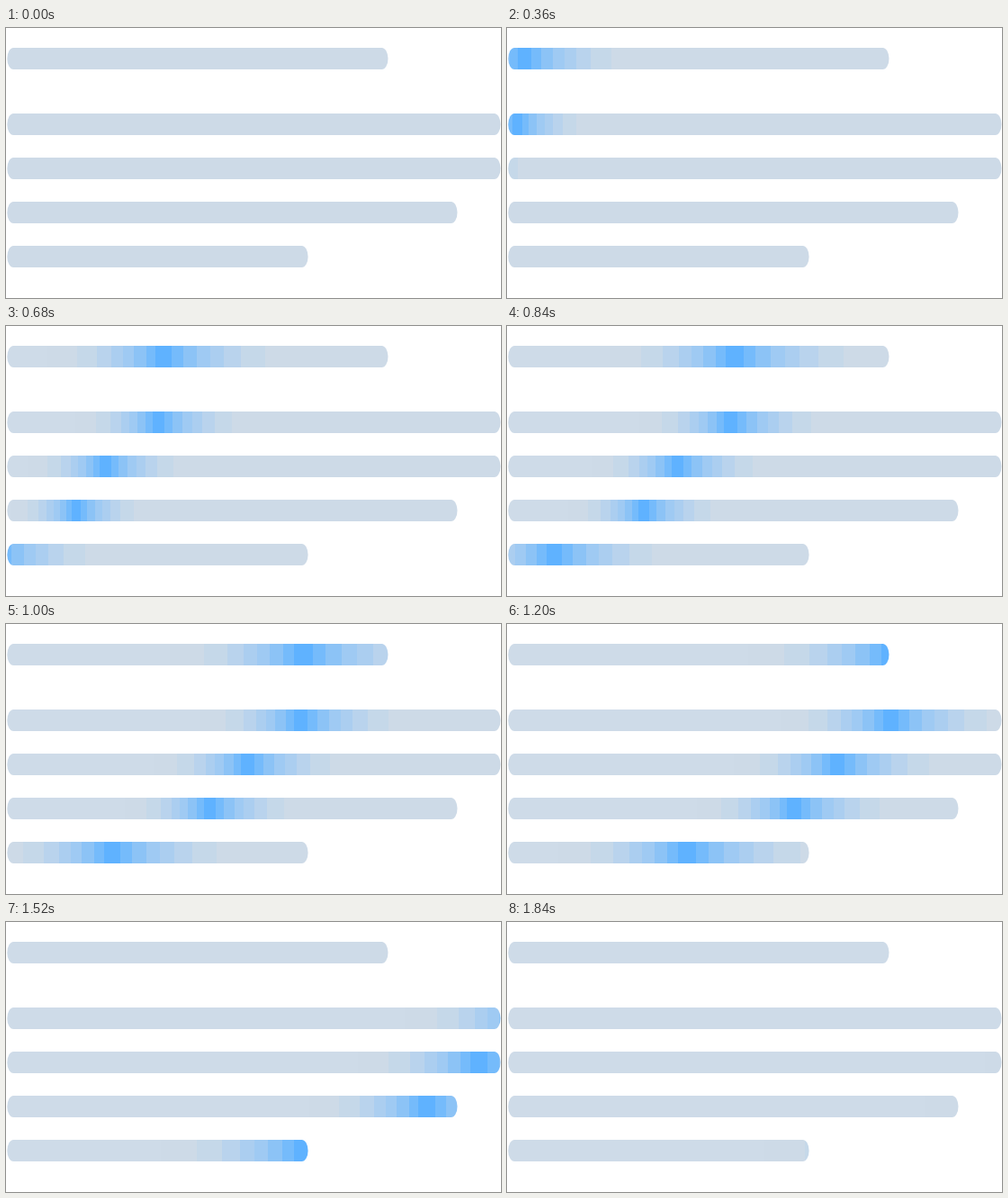
Animation, 550 px wide and 300 px high, one loop 2.32 s. Source, as an HTML page with a canvas:

```html
<!DOCTYPE html>
<html lang="en">
<head>
<meta charset="utf-8">
<title>Loading placeholder</title>
<style>
  html, body { margin: 0; width: 100%; height: 100%; overflow: hidden; background: #fff; }
  canvas { display: block; }
</style>
</head>
<body>
<canvas id="stage" width="550" height="300"></canvas>
<script>
const ctx = document.getElementById('stage').getContext('2d');
const LOOP = 2320, STEP = 40, START = 200, END = 1840;
const LEFT = 1.3, HEIGHT = 24;
const BASE = '#cddae7', TRAIL = '#cedbe8';

// Bands of the glow from its centre outwards; edges are shares of its reach.
const COLORS = ['#5fb2ff', '#75bbfb', '#8cc3f6', '#9fcaf3', '#abcef0', '#b9d3ed', '#c5d8e9'];
const EDGES = [0.087, 0.197, 0.333, 0.462, 0.595, 0.765, 1];
const LEFT_RATIO = 0.84, TRAIL_EDGE = 1.34;

// Glow centre x, its speed, reach and growth are given at t = 1 s (px, px/s).
const bars = [
  { y: 22,  right: 424.5, x: 329.7, speed: 485.5, reach: 130.8, growth: 53 },
  { y: 95,  right: 549.5, x: 326.8, speed: 493,   reach: 98.1,  growth: 50 },
  { y: 144, right: 549.5, x: 267.8, speed: 493.5, reach: 92.1,  growth: 50 },
  { y: 193, right: 501.5, x: 225.8, speed: 463,   reach: 83.6,  growth: 60 },
  { y: 242, right: 335.6, x: 117.2, speed: 410,   reach: 117.2, growth: 46 },
];

function glow(bar, seconds) {
  const center = bar.x + bar.speed * seconds;
  const reach = bar.reach + bar.growth * seconds;
  const tail = TRAIL_EDGE * LEFT_RATIO;
  const gradient = ctx.createLinearGradient(center - tail * reach, 0, center + reach, 0);
  const edge = (offset, before, after) => {
    const stop = (offset + tail) / (1 + tail);
    gradient.addColorStop(stop, before);
    gradient.addColorStop(stop, after);
  };
  const color = i => COLORS[i] || BASE;

  edge(-tail, TRAIL, BASE);
  for (let i = EDGES.length - 1; i >= 0; i--) edge(-EDGES[i] * LEFT_RATIO, color(i + 1), color(i));
  EDGES.forEach((e, i) => edge(e, color(i), color(i + 1)));
  return gradient;
}

function draw(now) {
  const t = Math.min(Math.floor(now % LOOP / STEP) * STEP, END);
  ctx.clearRect(0, 0, 550, 300);
  for (const bar of bars) {
    ctx.fillStyle = t < START ? BASE : glow(bar, t / 1000 - 1);
    ctx.beginPath();
    ctx.roundRect(LEFT, bar.y, bar.right - LEFT, HEIGHT, { x: 7, y: 12 });
    ctx.fill();
  }
}

const origin = performance.now();
function tick() {
  draw(performance.now() - origin);
  requestAnimationFrame(tick);
}
tick();
</script>
</body>
</html>
```
